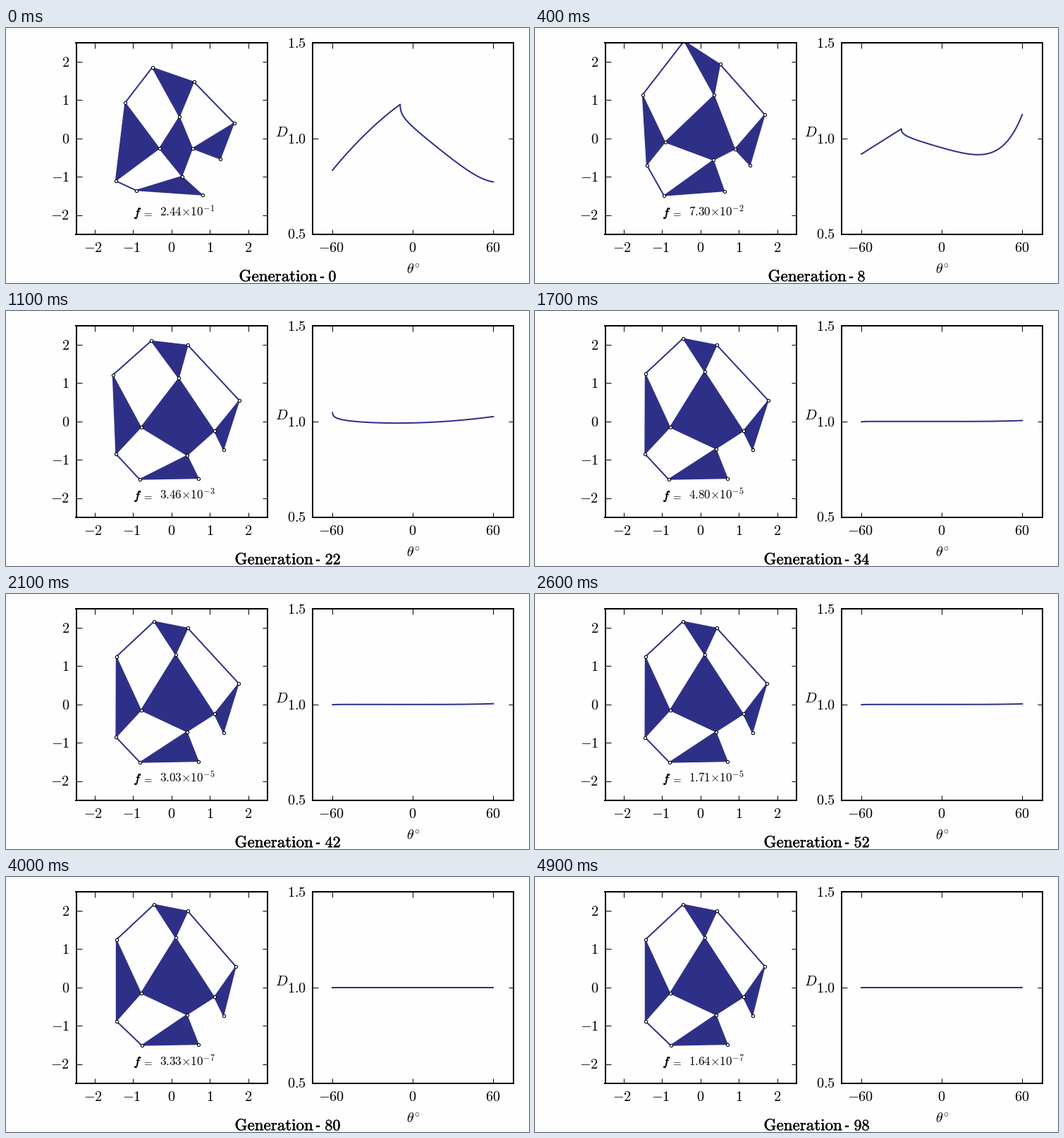
A matplotlib script that plays this animation: 742x362 px, repeating every 5 s.

```python
import numpy as np
import matplotlib.pyplot as plt
from matplotlib import patheffects
from matplotlib.animation import FuncAnimation

W, H, DPI = 742, 362, 100
PT = 72 / DPI  # points per pixel
FRAMES, INTERVAL = 50, 100
BLUE = "#2e3088"
UNIT = 54.35   # pixels per unit in the left panel
plt.rcParams["mathtext.fontset"] = "cm"

# Joints in stage pixels: the first linkage, an early one and the optimum.
START = dict(A=(208, 56.5), B=(267, 77), C=(246.5, 126.5), D=(169.5, 106.5),
             E=(218, 171.5), F=(156, 217.5), G=(250, 211), H=(265, 171.5),
             I=(324, 135.5), J=(304.5, 186.5), K=(185, 231), L=(279, 237.5))
EARLY = dict(A=(212, 19), B=(263, 52), C=(254.5, 96), D=(153, 95.5),
             E=(185, 162.5), F=(159, 195), G=(253.5, 188), H=(284, 172.5),
             I=(326.5, 123.5), J=(305.5, 195.5), K=(183.5, 238.5), L=(269, 232))
BEST = dict(A=(210.5, 39.5), B=(258.5, 49), C=(241, 86.5), D=(157, 89.5),
            E=(192, 165.5), F=(157, 205), G=(257, 196), H=(296, 171),
            I=(326.5, 127.5), J=(309, 197.5), K=(193, 239.5), L=(273.5, 238))
# The last joints to settle before the optimum.
LATE = {**BEST, "F": (156.5, 203.5), "I": (331.5, 127.5), "K": (190, 239.5)}
NEAR = {**LATE, "A": (206.5, 43), "C": (245.5, 96), "D": (152, 91.5),
        "G": (257.5, 205.5)}

STAGES = [0, 8, 22, 34, 80]  # generations at which the stages are reached
POSES = [np.array([pose[k] for k in sorted(pose)], float)
         for pose in (START, EARLY, NEAR, LATE, BEST)]
PLATES = ["ABC", "DEF", "CEGH", "HIJ", "KGL"]
BARS = ["DA", "BI", "FK"]


def curve(cusp, left, bulge, peak, base, slope, bend, lift):
    """Rising branch up to the cusp, then a sharp decay onto a smooth trend."""
    u = np.linspace(0, 1, 60)
    v = np.linspace(0, 1, 240) ** 2
    rise = left + (peak - left) * (u + bulge * u * (1 - u))
    fall = (base + slope * v + bend * v ** 2 + lift * v ** 6
            + (peak - base) * np.exp(-6 * np.sqrt(v)))
    theta = np.r_[-60 + u * (cusp + 60), cusp + v * (60 - cusp)]
    return np.array([theta, np.r_[rise, fall]])


CURVES = [curve(-9.5, .835, .25, 1.178, 1.105, -.385, 0, .053),
          curve(-30.3, .919, 0, 1.05, 1.01, -.18, 0, .295),
          curve(-60, 1.046, 0, 1.046, 1.0035, -.068, .09, 0),
          curve(-60, .998, 0, .998, 1.001, -.002, 0, .006),
          curve(-60, 1, 0, 1, 1, 0, 0, 0)]

fig = plt.figure(figsize=(W / DPI, H / DPI), dpi=DPI, facecolor="#fefefe")


def label(x, y, text, size=20.3, ha="center", **kw):
    """Text with its baseline at stage pixel (x, y)."""
    return fig.text(x / W, 1 - y / H, text, fontsize=size * PT, ha=ha,
                    va="baseline", **kw)


def panel(x0, x1, xlim, ylim, xticks, yticks, y0=21, y1=292.7):
    ax = fig.add_axes([x0 / W, 1 - y1 / H, (x1 - x0) / W, (y1 - y0) / H])
    ax.set(xlim=xlim, ylim=ylim, xticks=xticks, yticks=yticks)
    ax.patch.set_visible(False)
    ax.tick_params(direction="in", length=7.5 * PT, width=PT, top=True,
                   right=True, labelbottom=False, labelleft=False)
    for spine in ax.spines.values():
        spine.set_linewidth(2 * PT)
    return ax


# The left panel is scaled in stage pixels, the right one in degrees.
steps = np.arange(-2, 3)
mech = panel(99.5, 371.2, (100, 371.7), (293.2, 21.5),
             235.3 + UNIT * steps, 157.3 + UNIT * steps)
plot = panel(434.8, 719.8, (-75, 75), (.5, 1.5), [-60, 0, 60], [.5, 1, 1.5])

for k in steps:
    label(234.6 + UNIT * k - 2 * (k < 0), 318, f"${k}$")
    label(90, 163.5 - UNIT * k, f"${k}$", ha="right")
for angle in (-60, 0, 60):
    label(577 + 1.9 * angle - (angle < 0), 318, f"${angle}$")
for value in (.5, 1, 1.5):
    label(425.7, 163.5 - 271.7 * (value - 1), f"${value:.1f}$", ha="right")
label(391, 154.5, "$D$")
label(573.5, 348, r"$\theta$")
label(583, 340, r"$\circ$", 14)


def thicken(width):
    return [patheffects.withStroke(linewidth=width * PT, foreground="black")]


label(181.5, 267.5, "$f$", 17.2, "left", path_effects=thicken(.6))
label(201, 267.5, "$=$", 15)
score = label(218, 267.5, "", 17.2, "left")
heavy = dict(path_effects=thicken(.4))
title = label(0, 359.5, r"$\mathrm{Generation}$", 23, "left", **heavy)
dash = label(0, 359.5, "-", 22, family="Liberation Serif", **heavy)
count = label(0, 359.5, "", 22, "right", **heavy)

plates = [mech.fill([0], [0], fc=BLUE, ec=BLUE, lw=1.4 * PT, joinstyle="round",
                    zorder=2)[0] for _ in PLATES]
bars = [mech.plot([], [], color=BLUE, lw=2 * PT, zorder=2)[0] for _ in BARS]
joints, = mech.plot([], [], "o", ms=4.2 * PT, mfc="white", mec="black",
                    mew=1.1 * PT, zorder=3)
line, = plot.plot([], [], color=BLUE, lw=2 * PT)


def blend(states, gen):
    stage = np.interp(gen, STAGES, range(len(STAGES)))
    i = min(int(stage), len(STAGES) - 2)
    return states[i] + (states[i + 1] - states[i]) * (stage - i)


def fitness(gen):
    logs = np.log10([2.44e-1, 7.30e-2, 3.46e-3, 4.80e-5, 1.71e-5, 3.33e-7,
                     1.64e-7])
    return 10 ** np.interp(gen, [0, 8, 22, 34, 52, 80, 98], logs)


def update(frame):
    gen = 2 * frame
    pose = blend(POSES, gen)

    def pick(names):
        return pose[[ord(c) - ord("A") for c in names]]

    for patch, names in zip(plates, PLATES):
        patch.set_xy(pick(names))
    for bar, names in zip(bars, BARS):
        bar.set_data(*pick(names).T)
    joints.set_data(*pose.T)
    line.set_data(*blend(CURVES, gen))

    mantissa, power = f"{fitness(gen):.2e}".split("e")
    score.set_text(rf"${mantissa}{{\times}}10^{{{int(power)}}}$")

    half = 69.5 if gen < 10 else 75.5
    title.set_x((400 - half) / W)
    dash.set_x((400 - half + 118) / W)
    count.set_x((400 + half) / W)
    count.set_text(rf"$\mathrm{{{gen}}}$")
    return [*plates, *bars, joints, line, score, title, dash, count]


anim = FuncAnimation(fig, update, frames=FRAMES, interval=INTERVAL,
                     repeat=True, repeat_delay=0, blit=False)
plt.show()
```
